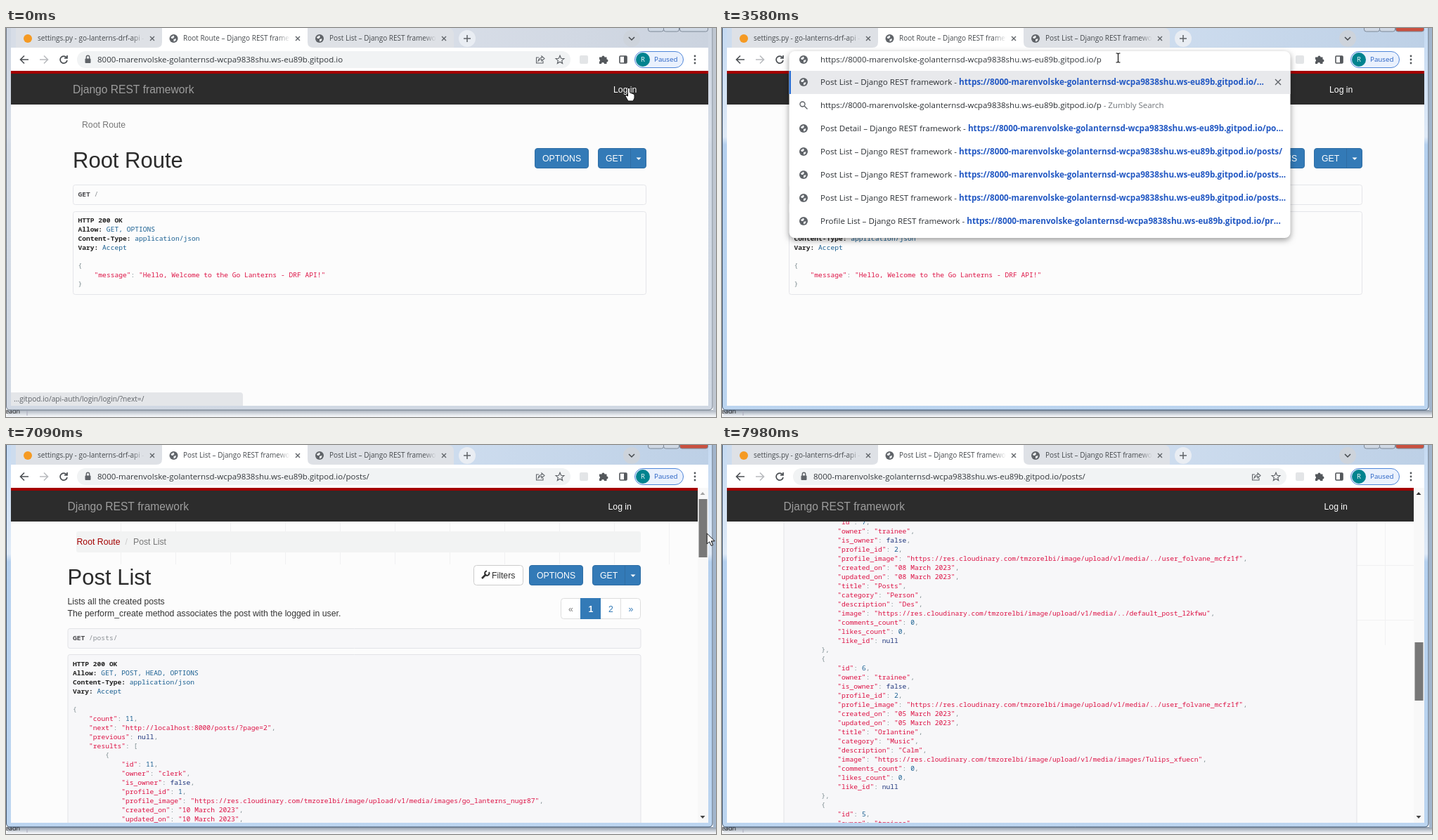
Animation, 1010 px wide and 554 px high, one loop 8000 ms. Source, as an HTML page with a canvas:

```html
<!DOCTYPE html>
<html lang="en">
<head>
<meta charset="utf-8">
<title>Browsing an API</title>
<style>
html, body { margin: 0; width: 100%; height: 100%; overflow: hidden; }
canvas { display: block; }
</style>
</head>
<body>
<canvas id="stage" width="1010" height="554"></canvas>
<script>
const c = document.getElementById('stage').getContext('2d');
const UI = '"Open Sans", sans-serif', WEB = '"Liberation Sans", sans-serif', MONO = '"Noto Sans Mono", monospace';
const HOST = '8000-marenvolske-golanternsd-wcpa9838shu.ws-eu89b.gitpod.io';
const GREY = '#5f6368', BLUE = '#337ab7', PAGE = '#fcfcfc', PRE = '#f7f7f9';

// ---- drawing helpers
function rect(x, y, w, h, fill, r = 0, line, lineWidth = 1) {
  c.beginPath();
  c.roundRect(x, y, w, h, r);
  if (fill) { c.fillStyle = fill; c.fill(); }
  if (line) { c.strokeStyle = line; c.lineWidth = lineWidth; c.stroke(); }
}
function disc(x, y, r, fill) {
  c.beginPath();
  c.arc(x, y, r, 0, 7);
  c.fillStyle = fill;
  c.fill();
}
function path(d, x, y, fill, line, lineWidth = 1.5) {
  const p = new Path2D(d);
  c.save();
  c.translate(x, y);
  if (fill) { c.fillStyle = fill; c.fill(p); }
  if (line) { c.strokeStyle = line; c.lineWidth = lineWidth; c.stroke(p); }
  c.restore();
}
// Draws text on a baseline and returns the x where it ends.
function text(s, x, y, color, size, family = WEB, weight = 400) {
  c.font = `${weight} ${size}px ${family}`;
  c.fillStyle = color;
  c.fillText(s, x, y);
  return x + c.measureText(s).width;
}
function gradient(x0, y0, x1, y1, ...stops) {
  const g = c.createLinearGradient(x0, y0, x1, y1);
  for (const [at, color] of stops) g.addColorStop(at, color);
  return g;
}
function clipped(x, y, w, h, draw) {
  c.save();
  c.beginPath();
  c.rect(x, y, w, h);
  c.clip();
  draw();
  c.restore();
}

// ---- timing: n equal jumps, the first at t0 and the last at t1
const jumps = (t, t0, t1, n) => t < t0 ? 0 : Math.min(n, Math.floor((t - t0) / (t1 - t0) * (n - 1) + 1.001));

const moves = [ // from, to, jumps, x, y
  [60, 260, 4, 725, 117],
  [450, 750, 6, 515, 123],
  [1000, 1300, 6, 527, 36],
  [1790, 2040, 4, 563.5, 36],
  [6060, 6290, 5, 922, 155],
  [6470, 6710, 4, 996, 111],
  [7090, 7470, 6, 1003, 200],
  [7710, 7980, 5, 1014, 236]
];
function pointer(t) {
  let x = 886, y = 86;
  for (const [t0, t1, n, tx, ty] of moves) {
    const k = jumps(t, t0, t1, n) / n;
    x += (tx - x) * k;
    y += (ty - y) * k;
  }
  return [x, y];
}
function thumbTop(t) {
  if (t < 7090) return 77;
  if (t < 7710) return 77 + 62 * (jumps(t, 7090, 7470, 6) - 1) / 5;
  return 146 + 135 * (jumps(t, 7710, 7980, 5) - 1) / 4;
}
const typing = [[3210, '/'], [3580, '/p'], [3760, '/po'], [4310, '/pos'], [4510, '/post'], [4620, '/posts']];

// ---- icons
function globe(x, y) {
  disc(x, y, 6, GREY);
  path('M-4 -2L0 -4.5L1 -2L-1 0L-3 0ZM0 1L3.5 0L3 3L0 4.5Z', x, y, '#eef0f2');
}
const cross = (x, y, r = 3) => path(`M${-r} ${-r}L${r} ${r}M${r} ${-r}L${-r} ${r}`, x, y, null, GREY, 1.4);

function drawPointer(t) {
  const [x, y] = pointer(t);
  if (t < 60) path('M-1.5 0Q0 -1.5 1.5 0V6L7 8Q8.5 8.5 8 14L6 18H-1L-5 11Q-5 9 -3 10L-1.5 11Z', x, y, '#fff', '#111', 1);
  else if (y < 57) path('M-3 0H-1L0 1L1 0H3M0 1V12M-3 13H-1L0 12L1 13H3', x, y, null, '#111', 1.2);
  else path('M0 0V15L3.5 12L6 17.5L8.5 16.5L6 11H11Z', x, y, '#fff', '#111', 1);
}

// ---- browser window
function tab(title, x) {
  text(title, x, 18, gradient(x, 0, x + 152, 0, [0.88, '#45494d'], [1, '#45494d00']), 10, UI);
  cross(x + 163, 15);
}
function drawFrame(active, posts) {
  rect(0, 0, 1010, 554, '#f4f6f9');
  rect(2, 544, 1008, 9, gradient(0, 544, 0, 553, [0, active ? '#8b98a8' : '#aab3be'], [1, '#f4f6f9']));
  text('eadn', -1, 549, '#111', 9, UI);
  path('M30 545V552', 0, 0, null, '#aab', 1);
  const side = active
    ? gradient(0, 0, 0, 554, [0, '#c5daf2'], [0.28, '#dfeaf7'], [0.3, '#b5d0ee'], [1, '#bcd5f0'])
    : gradient(0, 0, 0, 554, [0, '#ced6e2'], [0.28, '#d6dde7'], [0.3, '#d2dae5'], [1, '#d0d8e3']);
  rect(0.5, -8, 1004.5, 552, side, 5, active ? '#42566e' : '#6f7a88');
  rect(1006, 0, 4, 545, active ? '#a1b5cc' : '#bfc7d1');
  rect(7, 0, 992, 28, active
    ? gradient(640, 0, 1000, 0, [0, '#cddcee'], [1, '#bdd0e6'])
    : gradient(640, 0, 1000, 0, [0, '#d7dde7'], [1, '#cbd3df']));
  for (const x of [913.5, 935.5, 958.5])
    rect(x, -5, x > 950 ? 40 : 22, 10, active && x > 950 ? '#c9503f' : '#cfd8e4', 3, '#7d8896');

  rect(14, 0, 208, 28, '#dee1e6');
  rect(429, 0, 208, 28, '#dee1e6', [0, 8, 0, 0]);
  path('M214 28Q222 28 222 20V0H429V20Q429 28 437 28Z', 0, 0, '#fff');
  disc(31, 15, 6, '#f59a23');
  tab('settings.py - go-lanterns-drf-api - Git', 45);
  globe(238.5, 15);
  tab((posts ? 'Post List' : 'Root Route') + ' – Django REST framework', 252);
  globe(446, 15);
  tab('Post List – Django REST framework', 460);
  disc(656, 15, 12, '#e9edf3');
  path('M-5 0H5M0 -5V5', 656, 15, null, GREY);
  disc(890, 15, 12, '#cdd3db');
  path('M-4 -2L0 2L4 -2', 890, 15, null, '#44484c');
}
function drawToolbar(focused) {
  rect(7, 28, 992, 33, '#fff');
  path('M6 0H-5M0 -5.5L-5.5 0L0 5.5', 26, 45, null, '#4b4f53', 1.6);
  path('M-6 0H5M0 -5.5L5.5 0L0 5.5', 54, 45, null, '#b9bbbe', 1.6);
  path('M4 -3A5 5 0 1 0 5 1M5 -6V-2H1', 82, 45, null, '#4b4f53', 1.7);
  if (focused) rect(101, 33, 702, 24, '#fff', 12, '#2a6fd6', 2);
  else rect(101, 33, 702, 24, '#f1f3f4', 12);
  rect(112.5, 43.5, 8, 6.5, GREY, 1);
  path('M-2.2 0V-2.5A2.2 2.2 0 0 1 2.2 -2.5V0', 116.5, 44, null, GREY, 1.4);
  path('M-2 -3H-5.5V5H4V2M-3 2Q-2 -2.5 2 -2.5V-5L6 -1.5L2 2V-0.5Q-1 -0.5 -3 2Z', 760, 45, null, GREY, 1.1);
  let star = '';
  for (let i = 0; i < 10; i++) {
    const a = i * Math.PI / 5, r = i % 2 ? 2.8 : 6.2;
    star += (i ? 'L' : 'M') + r * Math.sin(a) + ' ' + -r * Math.cos(a);
  }
  path(star + 'Z', 788, 45.5, null, GREY, 1.2);
  rect(816, 39, 12, 12, '#e3e5e7', 2);
  path('M-6 -3.5H-2.5A2 2 0 1 1 1.5 -3.5H4.5V-.5A2 2 0 1 1 4.5 3.5V6H1A2 2 0 0 0 -3 6H-6V3A2 2 0 0 0 -6 -.5Z', 850, 45, '#54585c');
  rect(873, 40, 10, 10, null, 1, '#54585c', 1.6);
  rect(879, 40, 4, 10, '#54585c');
  rect(894.5, 33.5, 69, 23, '#eaf1fd', 12, '#4f86d9');
  disc(906, 45, 10, '#00838f');
  text('R', 903, 48, '#fff', 9.5, UI);
  text('Paused', 922, 48, '#2560c4', 9.8, UI);
  for (const y of [40, 45, 50]) disc(980, y, 1.4, '#54585c');
}
function drawAddress(t) {
  const ink = '#33373b', base = 49;
  if (t < 1620) return text(HOST, 130, base, ink, 11.5, UI);
  if (t < 2280) {
    c.font = `400 11.5px ${UI}`;
    rect(130, 36, c.measureText(HOST).width, 18, '#1f78d8');
    return text(HOST, 130, base, '#fff', 11.5, UI);
  }
  if (t < 3210) {
    const end = text('https://' + HOST, 130, base, ink, 11.5, UI);
    if (t < 2780) rect(end, 36, 1, 17, '#111');
    return;
  }
  if (t >= 5250) text(HOST + '/posts/', 130, base, ink, 11.5, UI);
}
function drawSuggestions(t) {
  const typed = 'https://' + HOST + typing.findLast(([at]) => at <= t)[1];
  const count = t < 3580 ? 8 : t < 3760 ? 7 : 6;
  const rows = [['Post List', '/...'], null, ['Post Detail', '/po...'], ['Post List', '/posts/'], ['Post List', '/posts...'],
    ['Post List', '/posts...'], ['Profile List', '/pr...'], ['Root Route', '/']];
  c.save();
  c.shadowColor = '#0006';
  c.shadowBlur = 9;
  c.shadowOffsetY = 3;
  rect(95.5, 33, 713, 35 + count * 33, '#fff', 8);
  c.restore();
  globe(116, 45);
  text(typed, 140, 49, '#33373b', 11.5, UI);
  rect(95.5, 61, 713, 33, '#e8e9ec');
  rect(95.5, 61, 2.5, 33, '#2a6fd6');
  cross(791, 77, 4);
  rows.slice(0, count).forEach((row, i) => {
    const y = 77 + 33 * i;
    if (row) {
      globe(116, y);
      const x = text(row[0] + ' – Django REST framework - ', 140, y + 4, '#2b2f33', 11.65, UI);
      text('https://' + HOST + row[1], x, y + 4, '#2258c3', 11.7, UI, 700);
    } else {
      path('M1.5 1.5L5.5 5.5M2 -1.5A3.5 3.5 0 1 1 -5 -1.5A3.5 3.5 0 1 1 2 -1.5', 116, y, null, GREY, 1.4);
      text(' - Zumbly Search', text(typed, 140, y + 4, '#2b2f33', 11.5, UI), y + 4, '#70757a', 11.5, UI);
    }
  });
}

// ---- page parts
function grid(x, y, w, h) {
  clipped(x, y, w, h, () => {
    for (let gx = 85; gx < 985; gx += 78) rect(gx, 109, 1, 176, '#f1f1f2');
    for (const gy of [171, 249]) rect(7, gy, 978, 1, '#f1f1f2');
  });
}
function button(label, x, w) {
  rect(x + 0.5, 171.5, w - 1, 28, BLUE, 3.5, '#2e6da4');
  text(label, x + 11, 190, '#fff', 12.25);
}
function buttons(x) {
  button('OPTIONS', x, 77);
  button('GET', x + 90, 69);
  rect(x + 136, 171, 1, 29, '#2e6da4');
  path('M-3.5 -1.5H3.5L0 2Z', x + 148, 186, '#fff');
}
const MONO_SIZE = 9.62, CELL = MONO_SIZE * 0.6;
const mono = (s, x, y, color, weight) => text(s, x, y, color, MONO_SIZE, MONO, weight);
function json(line, x, y) {
  for (const m of line.matchAll(/"[^"]*"|\d+|\w+|[^\s\w"]+/g)) {
    const s = m[0];
    const color = s[0] === '"' ? '#dd1144' : /\d/.test(s) ? '#195f91' : /\w/.test(s) ? '#1e347b' : '#7f8e92';
    mono(s, x + m.index * CELL, y, color);
  }
}
function request(route, x, y) {
  mono(route, mono('GET ', x, y, '#48484c', 700), y, '#8a8f94');
}
function response(methods, lines, x, y) {
  mono('HTTP 200 OK', x, y, '#222', 700);
  [['Allow: ', methods], ['Content-Type: ', 'application/json'], ['Vary: ', 'Accept']].forEach(([key, value], i) => {
    const row = y + 13 * (i + 1);
    mono(value, mono(key, x, row, '#222', 700), row, '#195f91');
  });
  lines.forEach((line, i) => json(line, x, y + 13 * (i + 5)));
}
function navbar(x, w) {
  rect(7, 61, w, 4, '#a30000');
  rect(7, 65, w, 44, '#2c2c2c');
  text('Django REST framework', x, 93, '#9d9d9d', 15.6);
  text('Log in', x + 769, 92, '#fff', 12.25);
}

// ---- the two pages
function drawRoot(t) {
  const redrawn = t >= 570 && t < 1620;
  if (redrawn) {
    rect(7, 109, 659, 429, '#fefefe');
    grid(7, 109, 640, 176);
    rect(95, 123, 571, 30, '#f3f3f3', 3);
    rect(735, 123, 51, 3, '#f5f5f5');
    rect(735, 126, 9, 7, '#f5f5f5');
  }
  navbar(95, 992);
  text('Root Route', 108, 142, '#777', 12.25);
  text('Root Route', 95, 199, '#2b2b2b', 31);
  buttons(752);
  for (const [y, h] of [[223, 28], [261, 118]]) {
    rect(95.5, y, 815, h, PAGE, 3);
    if (redrawn) rect(96, y, 570, h, PRE);
    rect(95.5, y + 0.5, 815, h, null, 3, '#e4e5e9');
  }
  request('/', 102.5, 240);
  response('GET, OPTIONS', ['{', '    "message": "Hello, Welcome to the Go Lanterns - DRF API!"', '}'], 102.5, 277);
  if (t < 570) {
    rect(7, 519, 330, 19, '#e4e6e9', [0, 4, 0, 0]);
    text('...gitpod.io/api-auth/login/login/?next=/', 11, 532, GREY, 10.2, UI);
  }
}

const MEDIA = 'https://res.cloudinary.com/tmzorelbi/image/upload/v1/media/';
const clerk = ['clerk', 1, 'images/go_lanterns_nugr87'], trainee = ['trainee', 2, '../user_folvane_mcfz1f'];
const posts = [
  [11, clerk, '10', 'Test1', 'Place', 'African continent.', '../default_post_ludaix'],
  [10, clerk, '10', 'Test1', 'Place', 'Africa', 'images/upload_zx2gfw'],
  [9, clerk, '08', 'Test', 'Place', 'Hills', '../default_post_ludaix'],
  [8, trainee, '08', 'Posts', 'Person', 'Des', '../default_post_l2kfwu'],
  [7, trainee, '08', 'Posts', 'Person', 'Des', '../default_post_l2kfwu'],
  [6, trainee, '05', 'Orlantine', 'Music', 'Calm', 'images/Tulips_xfuecn'],
  [5, trainee, '05', 'Posts', 'Music', 'Calm', '../default_post_l2kfwu']
].flatMap(([id, [owner, profile, avatar], day, title, category, description, image]) => {
  const record = {
    id, owner, is_owner: false, profile_id: profile, profile_image: MEDIA + avatar,
    created_on: day + ' March 2023', updated_on: day + ' March 2023', title, category, description,
    image: MEDIA + image, comments_count: 0, likes_count: 0, like_id: null
  };
  const body = JSON.stringify(record, null, 4).split('\n').map(line => ' '.repeat(8) + line);
  body[body.length - 1] += ',';
  return body;
});
const listing = ['{', '    "count": 11,', '    "next": "http://localhost:8000/posts/?page=2",',
  '    "previous": null,', '    "results": [', ...posts];

function drawPosts(t) {
  const top = thumbTop(t), scroll = Math.ceil((top - 77) * 5.769);
  clipped(7, 109, 978, 429, () => {
    if (scroll) grid(903, 109, 82, 176);
    else if (t >= 6060) grid(100, 109, 885, 61);
    c.translate(0, -scroll);
    if (t >= 6060) rect(100, 123, 803, 30, '#f2f3f3', 3);
    text('Root Route', 100.5, 142, '#a30000', 12.25);
    text('/', 169.5, 142, '#ccc', 12.25);
    text('Post List', 181, 142, '#777', 12.25);
    text('Post List', 87.5, 199, '#2b2b2b', 31);
    rect(665.5, 171.5, 70, 28, '#fff', 4, '#ccc');
    path('M-5 5L1 -1', 682, 185, null, '#333', 2.6);
    path('M5 -4A3.2 3.2 0 1 1 2 -5.5', 682, 185, null, '#333', 2);
    text('Filters', 691, 190, '#333', 12.25);
    buttons(744);
    text('Lists all the created posts', 87.5, 227, '#333', 12.25);
    text('The perform_create method associates the post with the logged in user.', 87.5, 244, '#333', 12.25);
    rect(789.5, 218.5, 113, 29, '#fff', 4, '#ddd');
    rect(817, 218, 29, 30, BLUE);
    rect(874, 218, 1, 30, '#ddd');
    ['«', '1', '2', '»'].forEach((s, i) =>
      text(s, 800 + 28.5 * i, 238, ['#777', '#fff', BLUE, BLUE][i], 12.25, WEB, i === 1 ? 700 : 400));
    rect(88, 261.5, 815, 28, PRE, 3, '#e2e3e7');
    request('/posts/', 95, 278);
    rect(88, 298.5, 815, 2400, PRE, 3, '#e2e3e7');
    response('GET, POST, HEAD, OPTIONS', listing, 95, 315);
  });
  navbar(87.5, 977);
  rect(984, 61, 15, 477, '#f8f8f8');
  rect(985.5, top, 12, 83, t >= 7090 ? '#787878' : t >= 6640 ? '#a8a8a8' : '#c1c1c1');
  path('M-3.5 2L0 -2L3.5 2Z', 991, 69, scroll ? '#333' : '#a3a3a3');
  path('M-3.5 -2L0 2L3.5 -2Z', 991, 530, '#444');
}

function draw(now = performance.now()) {
  const t = now % 8000, onPosts = t >= 5250;
  drawFrame(t >= 1620, onPosts);
  rect(7, 61, 992, 477, PAGE);
  onPosts ? drawPosts(t) : drawRoot(t);
  drawToolbar(t >= 1620 && t < 3210);
  drawAddress(t);
  if (t >= 3210 && t < 5250) drawSuggestions(t);
  drawPointer(t);
  requestAnimationFrame(draw);
}
draw();
</script>
</body>
</html>
```
